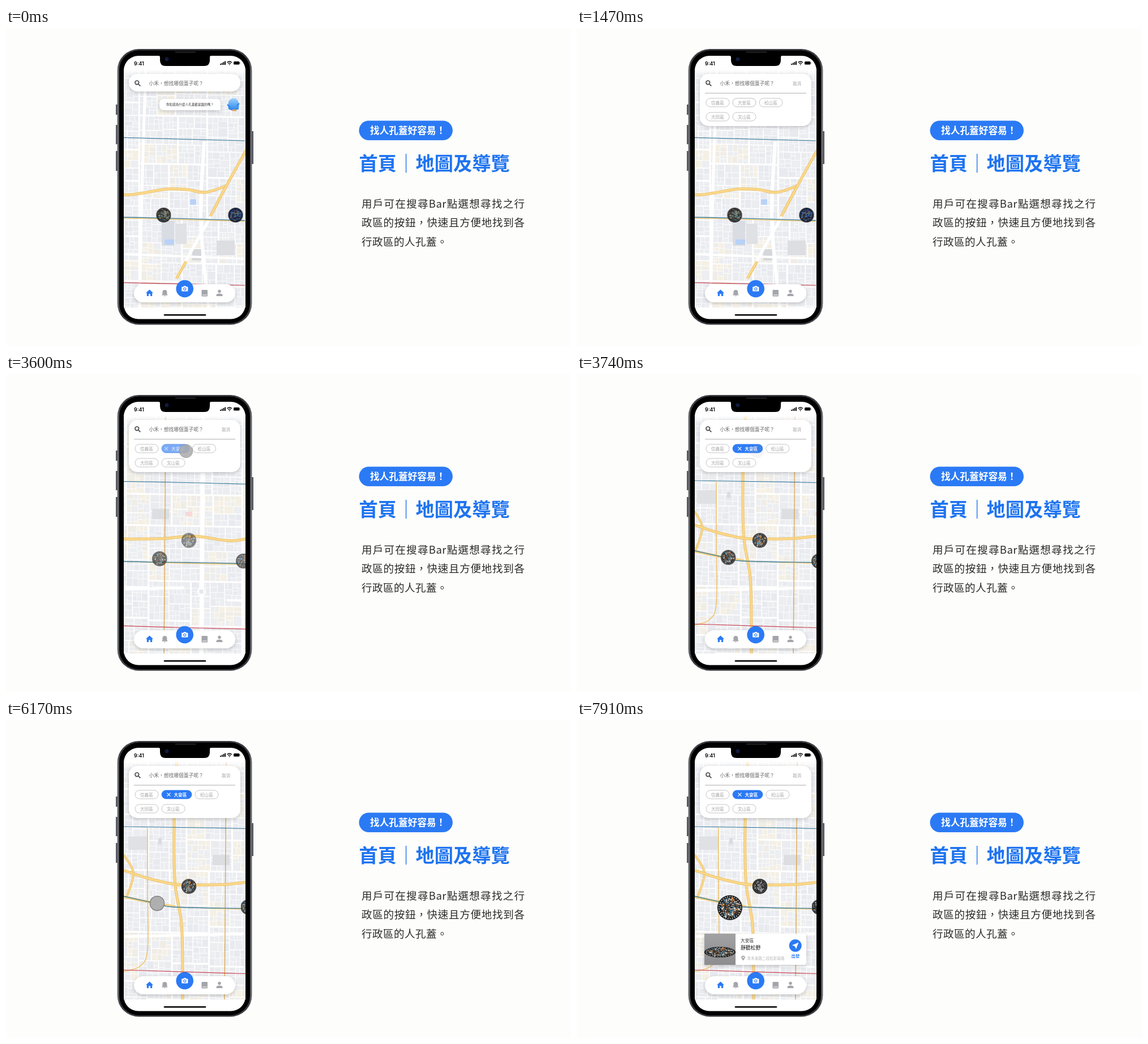
These frames come from a looping animation (998 px wide and 561 px high, 8000 ms). An HTML page with a canvas:

```html
<!DOCTYPE html>
<html lang="zh-Hant">
<head>
<meta charset="utf-8">
<title>地圖及導覽</title>
<style>
  html, body { margin: 0; width: 100%; height: 100%; overflow: hidden; background: #fdfdfb; }
  body { position: relative; font-family: "Noto Sans CJK TC", "Noto Sans CJK", "Noto Sans", sans-serif; }
  svg, .map, .copy { position: absolute; left: 0; top: 0; }
  .map { left: 208px; top: 72px; width: 215px; height: 421px; overflow: hidden; }
  .map::after { content: ""; position: absolute; inset: 0; background: linear-gradient(#fff, #fff0 16px); }
  canvas { position: absolute; left: -289px; top: 0; }
  .copy { left: 628px; top: 291.5px; width: 288.5px; margin: 0; font-size: 18.6px; font-weight: 350;
    line-height: 33.8px; letter-spacing: .4px; text-align: justify; color: #2b2b2b; }

  /* 8 s loop: open at 1050 ms, filter at 3464 ms, select at 6250 ms */
  canvas, .anim { animation: 8s linear infinite; }
  canvas { animation-name: pan; }
  .panel { animation-name: open; }
  .opened { animation-name: show-open; }
  .bubble { animation-name: hide-open; }
  .filtered { animation-name: show-filter; }
  .unfiltered { animation-name: hide-filter; }
  .chip { animation-name: chip; }
  .label { animation-name: label; }
  .push { animation-name: push; }
  .first { animation-name: first; }
  .third { animation-name: third; }
  .grey { animation-name: show-card; }
  .card { animation-name: card; }
  .tap1 { animation-name: tap1; }
  .tap2 { animation-name: tap2; }
  .tap3 { animation-name: tap3; }

  @keyframes pan {
    0%, 43.3% { transform: none; animation-timing-function: ease-out; }
    47.1%, 100% { transform: translateX(289px); }
  }
  @keyframes open {
    0%, 13.1% { height: 31px; animation-timing-function: ease-out; }
    16.9%, 100% { height: 92px; }
  }
  @keyframes show-open { 0%, 13.5% { opacity: 0; } 16.9%, 100% { opacity: 1; } }
  @keyframes hide-open { 0%, 13.1% { opacity: 1; } 15.6%, 100% { opacity: 0; } }
  @keyframes show-filter {
    0%, 43.3% { opacity: 0; animation-timing-function: ease-out; }
    47.1%, 100% { opacity: 1; }
  }
  @keyframes hide-filter {
    0%, 43.3% { opacity: 1; animation-timing-function: ease-out; }
    47.1%, 100% { opacity: 0; }
  }
  @keyframes chip {
    0%, 43.3% { width: 41px; fill: #fff; stroke: #aaa; animation-timing-function: ease-out; }
    47.1%, 100% { width: 53px; fill: #2b7af5; stroke: #2b7af5; }
  }
  @keyframes label {
    0%, 43.3% { opacity: 0; transform: translateX(-12px); animation-timing-function: ease-out; }
    47.1%, 100% { opacity: 1; transform: none; }
  }
  @keyframes push {
    0%, 43.3% { transform: none; animation-timing-function: ease-out; }
    47.1%, 100% { transform: translateX(12px); }
  }
  @keyframes first {
    0%, 43.3% { transform: translate(278.5px, 330px); animation-timing-function: ease-out; }
    47.1%, 78.1% { transform: translate(267px, 323.5px); animation-timing-function: ease-out; }
    81.9%, 100% { transform: translate(270px, 331px) scale(1.69); }
  }
  @keyframes third {
    0%, 43.3% { transform: translate(405.5px, 330px); animation-timing-function: ease-out; }
    47.1%, 100% { transform: translate(427.5px, 330px); }
  }
  @keyframes show-card { 0%, 78.1% { opacity: 0; } 81.9%, 100% { opacity: 1; } }
  @keyframes card {
    0%, 78.1% { opacity: 0; transform: translateY(14px); animation-timing-function: ease-out; }
    81.9%, 100% { opacity: 1; transform: none; }
  }
  @keyframes tap1 { 0%, 9.5% { opacity: 0; } 11%, 13.2% { opacity: .85; } 15%, 100% { opacity: 0; } }
  @keyframes tap2 { 0%, 40.5% { opacity: 0; } 42%, 45.2% { opacity: .85; } 47%, 100% { opacity: 0; } }
  @keyframes tap3 { 0%, 74.5% { opacity: 0; } 76%, 78% { opacity: .95; } 79.5%, 100% { opacity: 0; } }

  .soft { filter: drop-shadow(0 2px 3px #0003); }
  .blue { fill: #2b7af5; }
  .icon { fill: #a3a5aa; }
  .chips rect { fill: #fff; stroke: #b4b4b4; stroke-width: .8; }
  .chips text, .dim { font-size: 7.6px; fill: #a4a4a4; }
  .b { font-weight: 700; }
</style>
</head>
<body>
<svg width="998" height="561">
  <defs>
    <linearGradient id="metal">
      <stop offset="0" stop-color="#77797f"/><stop offset=".02" stop-color="#3c3d42"/>
      <stop offset=".98" stop-color="#3c3d42"/><stop offset="1" stop-color="#77797f"/>
    </linearGradient>
  </defs>
  <path d="M195.5 135v18M195.5 171v34M195.5 217v35M435.5 182v58" stroke="#55575d" stroke-width="3"/>
  <rect x="196.5" y="37" width="238" height="486.500" rx="38" fill="url(#metal)"/>
  <rect x="200" y="39.500" width="231" height="481.500" rx="35"/>
  <rect x="208" y="49" width="215" height="464.500" rx="26" fill="#fff"/>
</svg>

<div class="map"><canvas width="504" height="421"></canvas></div>

<svg width="998" height="561">
  <defs>
    <clipPath id="screen"><rect x="208" y="72" width="215" height="421"/></clipPath>
    <clipPath id="photo"><rect x="225" y="377" width="55" height="55"/></clipPath>
    <linearGradient id="mascot" x2="0" y2="1">
      <stop offset="0" stop-color="#9fd2fb"/><stop offset="1" stop-color="#2583ee"/>
    </linearGradient>
    <linearGradient id="stone" x2="0" y2="1">
      <stop offset="0" stop-color="#a2a2a3"/><stop offset="1" stop-color="#8d8d90"/>
    </linearGradient>
  </defs>

  <path d="M267 48q5 0 5 4v5q0 10 10 10h68q10 0 10-10v-5q0-4 5-4z"/>
  <circle cx="284" cy="55" r="3.500" fill="#111a3c"/>
  <path d="M299 42.500h36" stroke="#26272b" stroke-width="2"/>
  <text x="226" y="65.500" font-size="8.800" font-weight="600" font-family="Inter, sans-serif">9:41</text>
  <path d="M379 65v-2M381.700 65v-3.500M384.400 65v-5M387.100 65v-6.500" stroke="#000" stroke-width="1.800"/>
  <path d="M390.500 61q4.200-4 8.400 0M392.300 63q2.400-2.200 4.800 0" fill="none" stroke="#000" stroke-width="1.300"/>
  <circle cx="394.700" cy="64.600" r=".9"/>
  <rect x="402" y="59" width="10.500" height="5.500" rx="1.500"/>
  <path d="M413.300 60.800v2" stroke="#777"/>

  <g clip-path="url(#screen)" id="markers"></g>

  <g class="anim bubble">
    <path class="soft" d="M279 125h92q8 0 8 8v12h-100q-8 0-8-8v-4q0-8 8-8z" fill="#fff"/>
    <text x="283" y="137.200" font-size="5.600" fill="#333">你知道為什麼人孔蓋都是圓的嗎？</text>
    <path d="M393 143q-3-19 9-19 11 0 9 19-9 5-18 0z" fill="url(#mascot)"/>
    <path d="M391 135l5 5M412 133l-4 4" stroke="#2583ee" stroke-width="2"/>
    <path d="M400 145h7" stroke="#ee9b4d" stroke-width="3"/>
  </g>

  <rect class="anim panel soft" x="217" y="81" width="197" height="31" rx="15" fill="#fff"/>
  <g fill="none" stroke="#4a4b4f" stroke-width="1.700">
    <circle cx="231.300" cy="96.300" r="3.300"/><path d="M233.800 98.800l3.600 3.600"/>
  </g>
  <text x="252.500" y="101.200" font-size="8.750" fill="#666">小禾，想找哪個蓋子呢？</text>

  <g class="anim opened">
    <text class="dim" x="381" y="101.300">取消</text>
    <path d="M226 115h179" stroke="#999" stroke-width=".8"/>
    <g class="chips">
      <rect x="228" y="124" width="41" height="15" rx="7.500"/><text x="237" y="134.600">信義區</text>
      <rect x="228" y="149" width="41" height="15" rx="7.500"/><text x="237" y="159.600">大同區</text>
      <rect x="275" y="149" width="41" height="15" rx="7.500"/><text x="284" y="159.600">文山區</text>
      <g class="anim push">
        <rect x="322" y="124" width="41" height="15" rx="7.500"/><text x="331" y="134.600">松山區</text>
      </g>
      <rect class="anim chip" x="275" y="124" width="41" height="15" rx="7.500"/>
      <text class="anim unfiltered" x="284" y="134.600">大安區</text>
    </g>
    <g class="anim label">
      <path d="M284.500 128.700l6 6m0-6l-6 6" stroke="#fff" stroke-width="1.100"/>
      <text class="b" x="296.500" y="134.600" font-size="7.600" fill="#fff">大安區</text>
    </g>
  </g>

  <g class="anim card">
    <rect class="soft" x="225" y="377" width="180" height="55" rx="4" fill="#fff"/>
    <g clip-path="url(#photo)" id="picture">
      <rect x="225" y="377" width="55" height="55" fill="url(#stone)"/>
    </g>
    <text x="289" y="392" font-size="7.700" fill="#333">大安區</text>
    <text x="289" y="405.400" font-size="8.800" font-weight="500" fill="#111">靜聽松野</text>
    <path d="M293.500 424.500q-3.200-4-3.200-5.600a3.200 3.200 0 0 1 6.400 0q0 1.600-3.200 5.600z" fill="#a9a9a9"/>
    <circle cx="293.500" cy="419" r="1.200" fill="#fff"/>
    <text x="300.500" y="422.600" font-size="6.600" fill="#b5b5b5">青禾東路二段松影南路</text>
    <circle class="blue" cx="385.700" cy="398" r="11"/>
    <path d="M391.500 392.500l-4.600 11.500-2-4.800-4.900-2z" fill="#fff"/>
    <text class="blue b" x="378.500" y="418.700" font-size="7.400">出發</text>
  </g>

  <rect class="soft" x="226" y="452" width="179" height="32" rx="16" fill="#fff"/>
  <path class="blue" d="M253.500 461.500l6.500 6h-1.800v5.500h-3.200v-3.800h-3v3.800h-3.200v-5.500h-1.800z"/>
  <path class="icon" d="M275 471.500l1.400-2v-3.500q0-3.700 4-4 4 .3 4 4v3.500l1.400 2zM278.800 472.300h3.200q-1.600 2.400-3.200 0z"/>
  <rect class="icon" x="345.500" y="462" width="10.500" height="11.500" rx="1"/>
  <path d="M347 471h8" stroke="#fff"/>
  <circle class="icon" cx="377" cy="464.500" r="2.700"/>
  <path class="icon" d="M371.500 473v-1.500q0-3 5.500-3t5.500 3v1.500z"/>
  <circle class="blue" cx="315.700" cy="460" r="15.300"/>
  <path d="M311 456.500h2.200l1-1.500h3.200l1 1.500h2.200q.8 0 .8.800v6.400q0 .8-.8.800h-9.600q-.8 0-.8-.8v-6.400q0-.8.800-.8z" fill="#fff"/>
  <circle cx="315.800" cy="460.300" r="2.100" fill="none" stroke="#2b7af5" stroke-width="1.100"/>
  <path d="M280 506.300h72" stroke="#000" stroke-width="2.500" stroke-linecap="round"/>

  <g fill="#aaa" stroke="#8d8d8d" stroke-width=".8">
    <circle class="anim tap1" cx="357" cy="103" r="12.500"/>
    <circle class="anim tap2" cx="318" cy="136" r="11.800"/>
    <circle class="anim tap3" cx="267" cy="323.500" r="12.500" fill="#b4b4b4"/>
  </g>

  <rect class="blue" x="623.500" y="163.500" width="165.500" height="34.500" rx="17.250"/>
  <text class="b" x="643" y="187.200" font-size="16.700" fill="#fff">找人孔蓋好容易！</text>
  <text class="b" x="623.500" y="250.500" font-size="33.300" fill="#1f74f0">首頁<tspan font-weight="400">｜</tspan>地圖及導覽</text>
</svg>

<p class="copy">用戶可在搜尋Bar點選想尋找之行政區的按鈕，快速且方便地找到各行政區的人孔蓋。</p>

<script>
  function seeded(seed) {
    return () => (seed = seed * 16807 % 2147483647) / 2147483647;
  }

  // City map: one wide strip, in coordinates of the first view.
  const ctx = document.querySelector('canvas').getContext('2d');
  const rnd = seeded(4211);
  const pick = list => list[Math.floor(rnd() * list.length)];
  const cool = ['#e8eaef', '#ebedf1', '#eaecf0', '#edeef1'];
  const warm = ['#f5f0e5', '#f0ede7', '#eceef1'];

  function blocks(x, y, w, h, tones) {
    const size = Math.max(w, h);
    if (size < 9 + rnd() * 9) {
      ctx.fillStyle = pick(tones);
      ctx.fillRect(x, y, w, h);
      return;
    }
    if (size > 45 && size < 85) tones = rnd() < .27 ? warm : cool;
    const gap = size > 110 ? 3 : size > 45 ? 1.6 : .8;
    const cut = .36 + rnd() * .28;
    if (w > h) {
      blocks(x, y, w * cut - gap / 2, h, tones);
      blocks(x + w * cut + gap / 2, y, w * (1 - cut) - gap / 2, h, tones);
    } else {
      blocks(x, y, w, h * cut - gap / 2, tones);
      blocks(x, y + h * cut + gap / 2, w, h * (1 - cut) - gap / 2, tones);
    }
  }

  // Smooth curve through all given points.
  function line(color, width, ...flat) {
    const at = i => {
      const k = 2 * Math.min(Math.max(i, 0), flat.length / 2 - 1);
      return [flat[k], flat[k + 1]];
    };
    ctx.strokeStyle = color;
    ctx.lineWidth = width;
    ctx.beginPath();
    ctx.moveTo(...at(0));
    for (let i = 0; i < flat.length / 2 - 1; i++) {
      const [a, b, c, d] = [at(i - 1), at(i), at(i + 1), at(i + 2)];
      ctx.bezierCurveTo(b[0] + (c[0] - a[0]) / 6, b[1] + (c[1] - a[1]) / 6,
        c[0] - (d[0] - b[0]) / 6, c[1] - (d[1] - b[1]) / 6, ...c);
    }
    ctx.stroke();
  }

  function road(width, ...points) {
    line('#e9bd62', width + 1, ...points);
    line('#fbd88a', width - .6, ...points);
  }

  function area(color, x, y, w, h) {
    ctx.fillStyle = color;
    ctx.fillRect(x, y, w, h);
  }

  ctx.fillStyle = '#fff';
  ctx.fillRect(0, 0, 504, 421);
  ctx.setTransform(1, .018, 0, 1, 81, -75);
  blocks(-90, 50, 530, 470, cool);
  ctx.setTransform(1, 0, 0, 1, 81, -72);

  area('#d9dce2', 275, 340, 22, 44);
  area('#dfe1e5', 299, 345, 20, 36);
  area('#d5d7db', 329, 390, 16, 20);
  area('#dcdee2', 372, 375, 32, 26);
  area('#b9d2f7', 325, 302, 11, 10);
  area('#b9d2f7', 280, 373, 17, 9);
  area('#dfe1e5', -73, 205, 34, 24);
  area('#dcdee2', 76, 238, 30, 18);
  area('#d9dce2', -20, 208, 6, 11);
  area('#f7d9d9', 135, 243, 12, 8);

  line('#fff', 5, -81, 382, 133, 377);
  line('#fff', 8, 166, 72, 163, 493);
  line('#fff', 5, 247, 72, 240, 290, 236, 493);
  line('#fff', 6, 350, 200, 344, 340, 358, 493);
  line('#fff', 4, 208, 399, 422, 407);
  line('#fff', 5, 362, 332, 300, 442);
  ctx.beginPath();
  ctx.arc(163, 384, 7, 0, 7);
  ctx.fillStyle = '#fff';
  ctx.fill();
  ctx.beginPath();
  ctx.arc(163, 384, 4, 0, 7);
  ctx.fillStyle = '#e7e9ee';
  ctx.fill();

  line('#efc36c', 1.6, -39, 190, -39, 300, -39, 405, -52, 434, -81, 444);
  line('#d9a243', 1.3, 100, 72, 97, 493);
  road(4, 13, 72, 9, 140, 8, 250, 11, 300, 21, 360, 23, 440, 23, 493);
  road(3, -81, 238, -64, 270, -76, 313);
  road(3, -81, 312, -22, 324, 10, 329);
  road(4, -81, 265, -39, 279, 11, 290, 61, 291, 100, 290, 150, 286, 210, 294, 242, 291, 285, 284, 320, 285, 352, 290, 388, 279);
  road(4, 424, 216, 389, 279, 361, 332);
  road(4, 318, 412, 301, 442);
  line('#efc76f', 1.6, 10, 330, 136, 334, 242, 336, 422, 341);
  line('#3c7f9f', 1.3, -81, 311, -22, 324, 10, 330, 136, 332.5, 242, 334.5, 422, 339.5);
  line('#3c7c9c', 1.2, -81, 188, 133, 191.500, 422, 199);
  line('#c93d4c', 1.2, -81, 441, 133, 447.500, 422, 454);

  // Manhole covers: radius 13 around the local origin.
  function cover(seed, colors) {
    const next = seeded(seed);
    const tone = () => colors[Math.floor(next() * colors.length)];
    let art = '<circle r="13" fill="#17181c"/>' +
      `<circle r="11.400" fill="none" stroke="${colors[0]}" stroke-width="1.300" stroke-dasharray="1.100 1.300"/>`;
    for (let i = 0; i < 85; i++) {
      const angle = i * 2.4, dist = Math.sqrt(i / 85) * 10.2;
      art += `<circle cx="${(Math.cos(angle) * dist).toFixed(1)}" cy="${(Math.sin(angle) * dist).toFixed(1)}" r="${(.65 + next() * .6).toFixed(1)}" fill="${tone()}"/>`;
    }
    return art;
  }
  const group = (names, art) => `<g class="${names}">${art}</g>`;
  const bright = ['#b9b3a4', '#d98b45', '#4f8fb5', '#8c5a3c', '#d8d2c4', '#55534e'];
  const sand = ['#8d8672', '#b0a383', '#4d94a8', '#6a6250', '#39434a'];
  const navy = ['#2f4f8c', '#27396b', '#4c7fc0', '#8a6f55', '#1f2a4a'];
  const greys = ['#8f8f8f', '#c2c2c2', '#555', '#3a3a3a'];

  document.getElementById('markers').innerHTML =
    group('anim third',
      group('anim unfiltered', cover(71, navy)) +
      group('anim filtered', cover(15, bright) + group('anim grey', cover(15, greys)))) +
    group('anim filtered',
      `<g transform="translate(323 293.500)">${cover(33, bright)}${group('anim grey', cover(33, greys))}</g>`) +
    group('anim first',
      group('anim unfiltered', cover(52, sand)) + group('anim filtered', cover(94, bright)));

  document.getElementById('picture').innerHTML +=
    `<g transform="translate(252.500 409.500) scale(2.120 .72)">${cover(94, bright)}</g>`;
</script>
</body>
</html>
```
